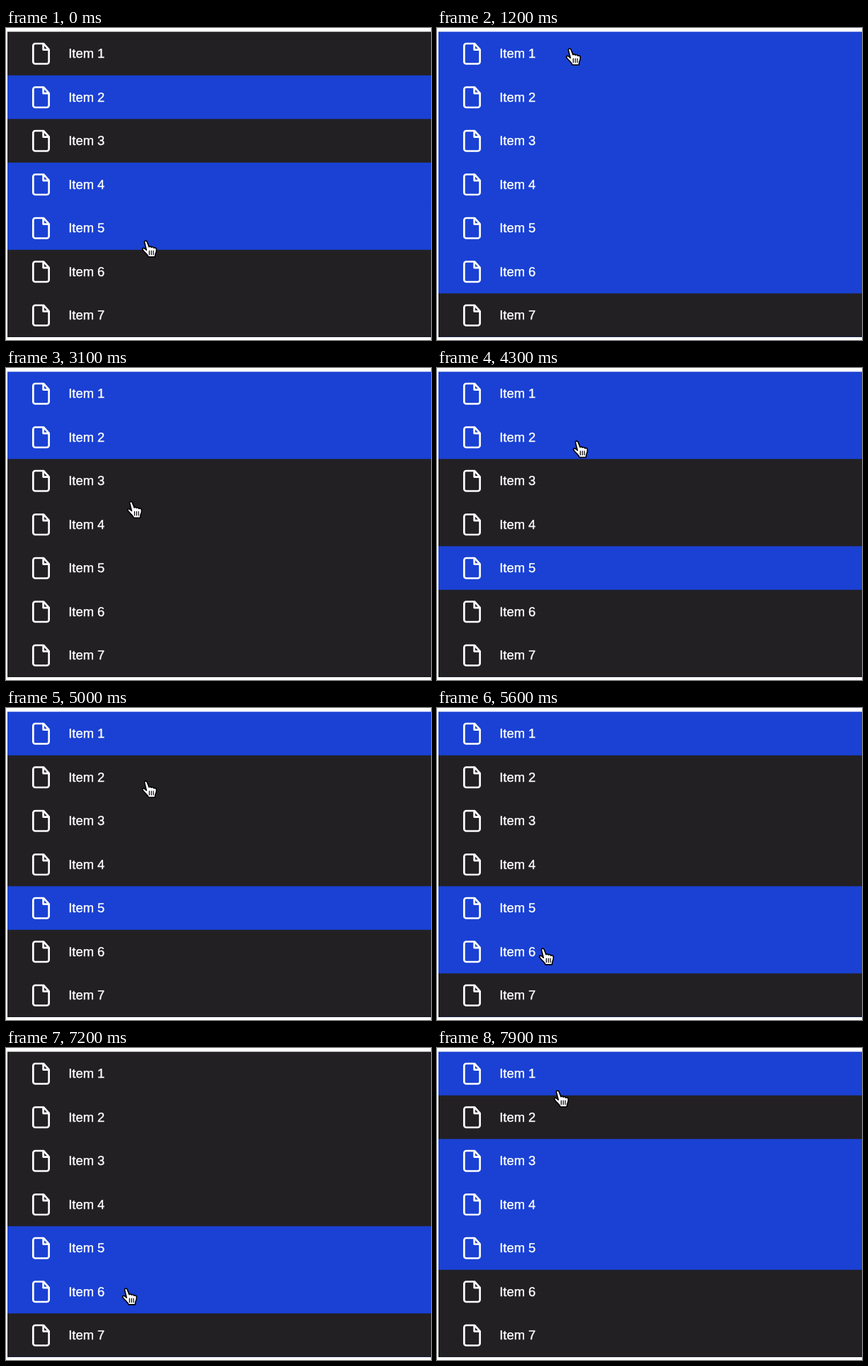
These frames come from a looping animation (600x440 px, 8000 ms). An HTML page:

```html
<!DOCTYPE html>
<html lang="en">
<head>
<meta charset="utf-8">
<title>Multi-select list</title>
<style>
  html, body { margin: 0; width: 100%; height: 100%; overflow: hidden; background: #fff; }
  svg { display: block; }
  text {
    font: 18.4px "Liberation Sans", Arial, sans-serif;
    fill: #fff; stroke: #fff; stroke-width: .35; text-rendering: geometricPrecision;
  }
  .icon { fill: none; stroke: #fff; stroke-width: 2.7; stroke-linejoin: round; }
</style>
</head>
<body>
<svg width="600" height="440" viewBox="0 0 600 440">
  <defs>
    <path id="file" class="icon" d="M41.4 22H53L60.6 30.3V47.4a3.1 3.1 0 0 1-3.1 3.1H41.4a3.1 3.1 0 0 1-3.1-3.1V25.1a3.1 3.1 0 0 1 3.1-3.1ZM52.6 22.3V30.6H60.3"/>
  </defs>
  <g id="list"></g>
  <g id="cursor">
    <g transform="translate(-.6 -.6) scale(1.1)" stroke="#000" stroke-linejoin="round" stroke-linecap="round">
      <path fill="#fff" stroke-width="1.5" d="M-1.8 1.5C-1.6-.6.8-.8 1.6 1L4.2 7.5C5 6.6 6.8 6.8 7.2 8 8.2 7.2 9.8 7.6 10.3 8.8 11.5 8.2 13.3 8.8 13.6 10.5 14 13 13 15.5 12.2 17L11.8 20.5H3.5C2.5 18 .5 16.5-1.5 14.3-2.8 12.8-4.2 11.6-4.4 10.4-4.4 8.8-2.4 8.6-1 10L.8 11.6Z"/>
      <path fill="none" stroke-width="1.1" d="M4.5 12.5v5M7.1 12.5v5M9.7 12.5v5"/>
    </g>
  </g>
</svg>
<script>
const LOOP = 8000, STEP = 100, ROWS = 7;
const TOP = 5.3, PITCH = 61.5;
const PAUSE = 200, TRAVEL = 500;

// Each action maps the selection, the anchor row and the clicked row to a new selection
const start = () => [1, 3, 4];
const pick = (selected, anchor, row) => [row];
const toggle = (selected, anchor, row) =>
  selected.includes(row) ? selected.filter(r => r !== row) : [...selected, row];
const extend = (selected, anchor, row) =>
  Array.from({ length: Math.abs(row - anchor) + 1 }, (_, i) => Math.min(row, anchor) + i);

// time, x, y, action
const clicks = [
  [0, 198, 301, start],
  [500, 191, 338, pick], [1100, 188, 30, extend],
  [1600, 187, 95, pick], [1900, 187, 282, extend], [2600, 181, 37, extend],
  [3600, 175, 272, toggle], [4800, 198, 104, toggle], [5500, 150, 340, toggle],
  [6000, 160, 35, toggle], [6200, 160, 95, toggle], [6500, 160, 159, extend],
  [6900, 168, 285, pick], [7200, 170, 340, extend], [7500, 171, 165, extend],
  [7800, 171, 61, toggle]
];

const list = document.getElementById('list');
const cursor = document.getElementById('cursor');

// Each row reaches to the bottom of the list and is covered by the next
list.innerHTML = Array.from({ length: ROWS }, (_, i) => `
  <rect x="2" y="${TOP + i * PITCH}" width="598" height="${(ROWS - i) * PITCH}"/>
  <use href="#file" y="${i * PITCH}"/>
  <text x="88.2" y="${42.4 + i * PITCH}">Item ${i + 1}</text>`).join('');
const rects = list.querySelectorAll('rect');

function selectionAt(t) {
  let selected = [], anchor = 0;
  for (const [time, , y, action] of clicks) {
    if (time > t) break;
    const row = Math.floor((y - TOP) / PITCH);
    selected = action(selected, anchor, row);
    if (action !== extend) anchor = row;
  }
  return selected;
}

// After a click the pointer rests, then glides to the next one
function pointerAt(t) {
  const i = clicks.findLastIndex(click => click[0] <= t);
  const [from, x, y] = clicks[i];
  const [to, nextX, nextY] = clicks[i + 1] ?? [LOOP, x, y];
  const leave = from + Math.min(PAUSE, (to - from) / 3);
  const p = Math.max(0, Math.min(1, (t - leave) / Math.min(TRAVEL, to - leave)));
  const eased = p * p * (3 - 2 * p);
  return [x + (nextX - x) * eased, y + (nextY - y) * eased];
}

function draw() {
  const t = Math.floor((performance.now() - began) % LOOP / STEP) * STEP;
  const selected = selectionAt(t);
  rects.forEach((rect, i) =>
    rect.setAttribute('fill', selected.includes(i) ? '#1a41d3' : '#222023'));
  cursor.setAttribute('transform', `translate(${pointerAt(t)})`);
  requestAnimationFrame(draw);
}

const began = performance.now();
draw();
</script>
</body>
</html>
```
